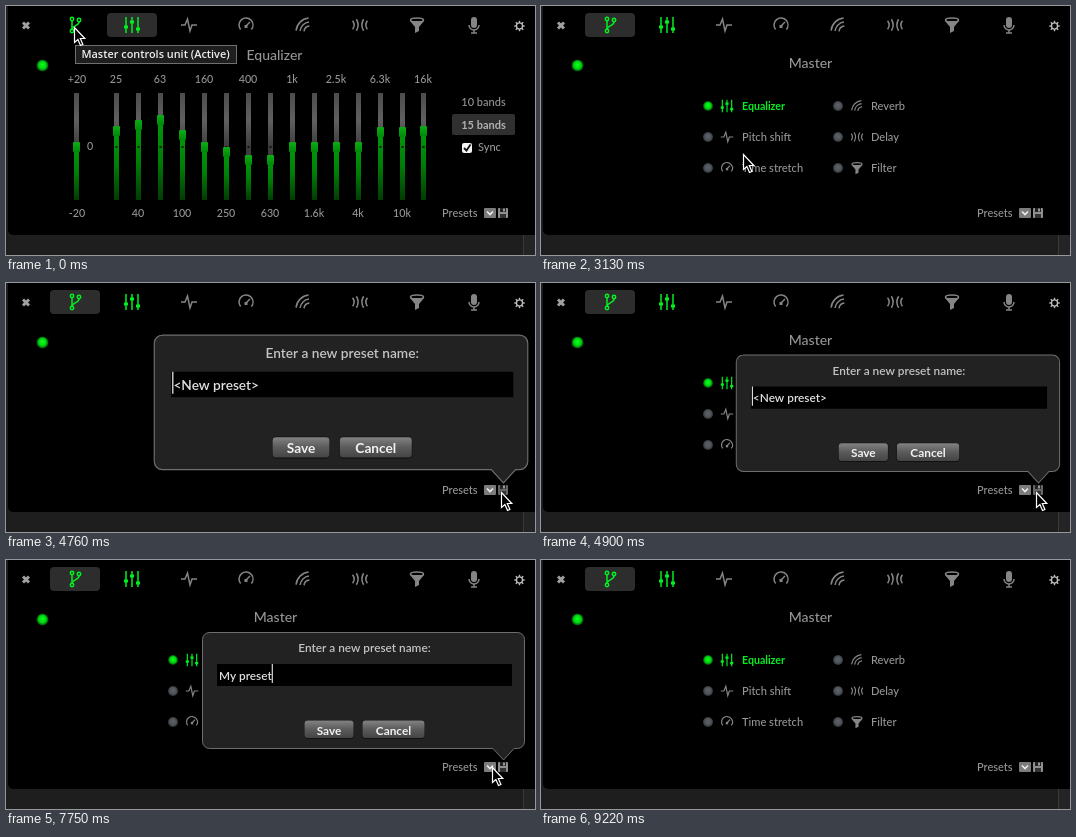
Recreate the animation shown at these times as an HTML page with a canvas. Size 529 by 249 pixels, loop 9.52 s.

```html
<!DOCTYPE html>
<html lang="en">
<head>
<meta charset="utf-8">
<title>Saving a preset</title>
<style>
html, body { margin: 0; width: 100%; height: 100%; overflow: hidden; background: #000; }
canvas { display: block; }
</style>
</head>
<body>
<canvas id="stage" width="529" height="249"></canvas>
<script>
const c = document.getElementById('stage').getContext('2d');
const LOOP = 9520, GREEN = '#00f020', GRAY = '#858585', LABEL = '#969696';
const TAU = Math.PI * 2;

// ---------- helpers ----------
const smooth = p => p * p * (3 - 2 * p);
const mix = (a, b, p) => a + (b - a) * p;

function text(s, x, y, { size = 11, color = LABEL, align = 'left', weight = 500, face = 'Lato' } = {}) {
  c.font = `${weight} ${size}px ${face}, sans-serif`;
  c.textAlign = align;
  c.fillStyle = color;
  c.fillText(s, x, y + 4);
}

function box(x, y, w, h, fill, r = 0) {
  c.fillStyle = fill;
  c.beginPath();
  c.roundRect(x, y, w, h, r);
  c.fill();
}

function fade(x0, y0, x1, y1, ...colors) {
  const g = c.createLinearGradient(x0, y0, x1, y1);
  colors.forEach((col, i) => g.addColorStop(i / (colors.length - 1), col));
  return g;
}

function line(...p) {
  c.beginPath();
  for (let i = 0; i < p.length; i += 2) c.lineTo(p[i], p[i + 1]);
  c.stroke();
}

function arc(x, y, r, a = 0, b = TAU) {
  c.beginPath();
  c.arc(x, y, r, a, b);
  c.stroke();
}

function led(x, y, r, on) {
  const g = c.createRadialGradient(x, y - 1, 0, x, y, r);
  g.addColorStop(0, on ? '#10ff20' : '#5c6268');
  g.addColorStop(0.6, on ? '#00d810' : '#50565b');
  g.addColorStop(1, on ? '#034006' : '#303437');
  c.fillStyle = g;
  c.beginPath();
  c.arc(x, y, r, 0, TAU);
  c.fill();
}

// ---------- icons, each about 16 px around the origin ----------
const icons = {
  branch() {
    [[-3, -6], [4, -5], [-3, 6]].forEach(([x, y]) => arc(x, y, 1.7));
    line(-3, -4, -3, 4);
    c.beginPath();
    c.moveTo(4, -3);
    c.bezierCurveTo(4, 1, -2, 0, -3, 4);
    c.stroke();
  },
  sliders() {
    [[-6, 2], [0, -3], [6, 4]].forEach(([x, y]) => {
      line(x, -8, x, 8);
      c.fillRect(x - 2, y - 1.5, 4, 3);
    });
  },
  pulse() { line(-8, 0, -4, 0, -1.5, -6, 1, 6, 3, 0, 8, 0); },
  gauge() {
    arc(0, 0, 7, Math.PI * 0.78, Math.PI * 2.22);
    line(0, 1, 4, -3);
    c.fillRect(-1.5, 0, 3, 3);
  },
  reverb() { [6, 10, 14].forEach(r => arc(7, 7, r, Math.PI + 0.1, Math.PI * 1.5 - 0.1)); },
  delay() {
    [[7, 0.65], [11, 0.55]].forEach(([r, a]) => {
      arc(-13, 0, r, -a, a);
      arc(13, 0, r, Math.PI - a, Math.PI + a);
    });
  },
  funnel() {
    c.beginPath();
    c.moveTo(-7, -4);
    c.lineTo(-2, 2); c.lineTo(-2, 8); c.lineTo(2, 6); c.lineTo(2, 2); c.lineTo(7, -4);
    c.fill();
    c.beginPath();
    c.ellipse(0, -5, 6.5, 2, 0, 0, TAU);
    c.stroke();
  },
  mic() {
    c.beginPath();
    c.roundRect(-3, -8, 6, 11, 3);
    c.fill();
    arc(0, 0, 5, 0, Math.PI);
    line(0, 5, 0, 8);
    line(-3, 8, 3, 8);
  },
  close() { c.lineWidth = 3; line(-3, -3, 3, 3); line(3, -3, -3, 3); },
  gear() {
    arc(0, 0, 3.4);
    for (let i = 0; i < 8; i++) {
      const x = Math.cos(i * TAU / 8), y = Math.sin(i * TAU / 8);
      line(x * 3.5, y * 3.5, x * 5.8, y * 5.8);
    }
  }
};

function icon(name, x, y, color = GRAY, scale = 1) {
  c.save();
  c.translate(x, y);
  c.scale(scale, scale);
  c.strokeStyle = c.fillStyle = color;
  c.lineWidth = 1.5;
  icons[name]();
  c.restore();
}

// ---------- window ----------
function frame(tab, hoverSave) {
  box(0, 0, 529, 249, '#1e1e1e');
  box(517, 229, 12, 20, '#242424');
  box(517, 229, 1, 20, '#3a3a3a');
  box(2, -8, 540, 237, '#000', 5);
  box(44 + 57 * tab, 7, 50, 24, '#2d2d2d', 4);
  icon('close', 20, 19.5, '#a0a0a0');
  ['branch', 'sliders', 'pulse', 'gauge', 'reverb', 'delay', 'funnel', 'mic']
    .forEach((n, i) => icon(n, 69 + 57 * i, 19, i < 2 ? GREEN : GRAY));
  icon('gear', 513.5, 20, '#c0c0c0', 0.9);
  led(36.5, 59.5, 6, true);

  text('Presets', 436, 207);
  box(478, 202, 12, 10, '#7c7c7c', 1);
  c.strokeStyle = '#eee';
  c.lineWidth = 1.6;
  line(481, 205.5, 484, 208.5, 487, 205.5);
  box(492, 202, 10, 10, hoverSave ? '#666' : '#909090', 1);
  box(494, 202, 6, 4, '#222');
  box(497, 202.5, 2, 3, '#999');
  box(494, 208, 6, 4, '#333');
}

function slider(x, y) {
  box(x - 2.5, 87, 5, y - 87, fade(0, 87, 0, 141, '#4c4c4c', '#606060', '#3c3c3c'));
  box(x - 2.5, y, 5, 194 - y, fade(0, y, 0, 194, '#009a08', '#007d06', '#023c04'));
  box(x - 1, 140, 2, 2, '#111');
  box(x - 3.5, y - 5, 7, 10, fade(0, y - 5, 0, y + 5, '#0cae14', '#008808'), 1);
}

function equalizer() {
  const levels = [125, 119, 114, 129, 141, 146, 154, 154, 141, 141, 141, 141, 126, 126, 125];
  const names = ['25', '40', '63', '100', '160', '250', '400', '630', '1k', '1.6k', '2.5k', '4k', '6.3k', '10k', '16k'];
  const label = { size: 10.7, align: 'center' };
  text('Equalizer', 268.5, 49.5, { size: 14, align: 'center' });
  slider(70.5, 141);
  text('+20', 71, 73, label);
  text('0', 84, 140, label);
  text('-20', 71, 207, label);
  levels.forEach((y, i) => {
    const x = 110.5 + Math.round(21.963 * i);
    slider(x, y);
    text(names[i], x - 0.5, i % 2 ? 207 : 73, label);
  });
  text('10 bands', 477.5, 96, { align: 'center' });
  box(446, 108, 63, 21, '#303030', 2);
  text('15 bands', 477.5, 119, { align: 'center', weight: 700, color: '#b0b0b0' });
  box(456, 137, 10, 10, '#f4f4f4', 2);
  c.strokeStyle = '#111';
  c.lineWidth = 1.8;
  line(458, 142, 460.5, 144.5, 464.5, 138.5);
  text('Sync', 472, 141);
}

function master() {
  text('Master', 269.5, 57.5, { size: 14, align: 'center' });
  [['Equalizer', 'sliders'], ['Pitch shift', 'pulse'], ['Time stretch', 'gauge'],
   ['Reverb', 'reverb'], ['Delay', 'delay'], ['Filter', 'funnel']].forEach(([name, glyph], i) => {
    const dx = i < 3 ? 0 : 130, y = 100 + 31 * (i % 3), on = i === 0;
    led(167 + dx, y, 5, on);
    icon(glyph, 186 + dx, y, on ? GREEN : GRAY, 0.78);
    text(name, 201 + dx * 0.992, y, { color: on ? GREEN : LABEL, weight: on ? 700 : 500, size: on ? 10.6 : 11.1 });
  });
}

function tooltip() {
  box(69, 39, 162, 19, '#707070');
  box(70, 40, 160, 17, '#1e1e1e');
  text('Master controls unit (Active)', 75.5, 48, { size: 10.9, color: '#eee', weight: 600, face: '"Open Sans"' });
}

// ---------- dialog ----------
function button(s, x, w) {
  box(x, 160, w, 19, '#111', 4);
  box(x + 0.5, 160.5, w - 1, 17.5, fade(0, 160, 0, 178, '#858585', '#5c5c5c', '#444'), 3);
  text(s, x + w / 2, 170.5, { size: 11.8, weight: 700, color: '#f2f2f2', align: 'center' });
}

function dialog(scale, alpha, entry, selected, caret) {
  c.save();
  c.globalAlpha = alpha;
  c.translate(498, 200);
  c.scale(scale, scale);
  c.translate(-498, -200);

  c.beginPath();
  c.moveTo(203, 72.5);
  c.arcTo(518.5, 72.5, 518.5, 80, 7);
  c.arcTo(518.5, 188.5, 510, 188.5, 7);
  c.lineTo(508, 188.5);
  c.lineTo(497.5, 200);
  c.lineTo(487, 188.5);
  c.arcTo(196.5, 188.5, 196.5, 180, 7);
  c.arcTo(196.5, 72.5, 204, 72.5, 7);
  c.closePath();
  c.fillStyle = '#222';
  c.fill();
  c.strokeStyle = '#6e6e6e';
  c.lineWidth = 1;
  c.stroke();

  text('Enter a new preset name:', 358.5, 88, { size: 11.8, weight: 600, color: '#c4c4c4', align: 'center' });
  box(211, 104, 295, 22, '#000');
  c.font = '600 11.8px Lato, sans-serif';
  const width = c.measureText(entry).width;
  if (selected) box(213, 105, width * selected, 18, '#6a6a6a');
  text(entry, 213, 115.5, { size: 11.8, weight: 600, color: '#e0e0e0' });
  if (caret) box(213 + (entry[0] === '<' ? -1 : width), 104, 1, 19, '#fff');
  button('Save', 298, 50);
  button('Cancel', 356, 63);
  c.restore();
}

function drawDialog(t) {
  if (t < 4460 || t >= 9220) return;
  const scale = t < 4610 ? 0.04 : t < 4760 ? 0.295 : t < 4900 ? 1.16 : t < 5050 ? 1.004 : 1;
  const alpha = t < 4610 ? 0.1 : t < 4760 ? 0.28 : t < 8770 ? 1 : t < 8920 ? 0.7 : t < 9070 ? 0.4 : 0.15;
  const typed = [[7750, 'My preset'], [7150, 'My prese'], [6850, 'My pre'], [6700, 'My p'], [6550, 'My'], [6400, 'M']]
    .find(([at]) => t >= at);
  const selected = t < 5650 || t >= 6400 ? 0 : t < 5800 ? 0.5 : 1;
  dialog(scale, alpha, typed ? typed[1] : '<New preset>', selected, !selected && t < 8190);
}

// ---------- pointer ----------
// Fraction of a move made in n equal jumps, the last one at the end time.
const jumps = (t, start, end, n) =>
  smooth(Math.min(n, Math.max(0, Math.floor((t - start + 4) / (end - start) * (n - 1)) + 1)) / n);

function pointerAt(t) {
  if (t >= 9220) return null;
  if (t >= 9070) return [336, 238];
  if (t >= 8920) return [330, 196];
  if (t >= 7750) {
    const p = jumps(t, 7750, 8630, 7);
    return [mix(495, 327, p), mix(209, 171, p)];
  }
  if (t >= 4010) return [495, 209];
  const p = t < 2840 ? 0 : jumps(t, 2840, 3870, 8);
  return [mix(68, 493, p), mix(21, 211, p) + 80 * Math.sin(Math.PI * p)];
}

function pointer(x, y) {
  c.save();
  c.translate(Math.round(x) + 0.5, Math.round(y) + 0.5);
  c.beginPath();
  [[0, 0], [0, 15], [3.4, 12], [6, 18], [8.4, 17], [5.8, 11], [10.3, 11]].forEach(p => c.lineTo(...p));
  c.closePath();
  c.fillStyle = '#000';
  c.strokeStyle = '#fff';
  c.lineWidth = 1.2;
  c.fill();
  c.stroke();
  c.restore();
}

function draw(t) {
  const onMaster = t >= 2250;
  frame(onMaster ? 0 : 1, t >= 3870 && t < 7750);
  onMaster ? master() : equalizer();
  if (t < 2100) tooltip();
  drawDialog(t);
  const at = pointerAt(t);
  if (at) pointer(...at);
}

const start = performance.now();
function tick() {
  draw((performance.now() - start) % LOOP);
  requestAnimationFrame(tick);
}
tick();
</script>
</body>
</html>
```
